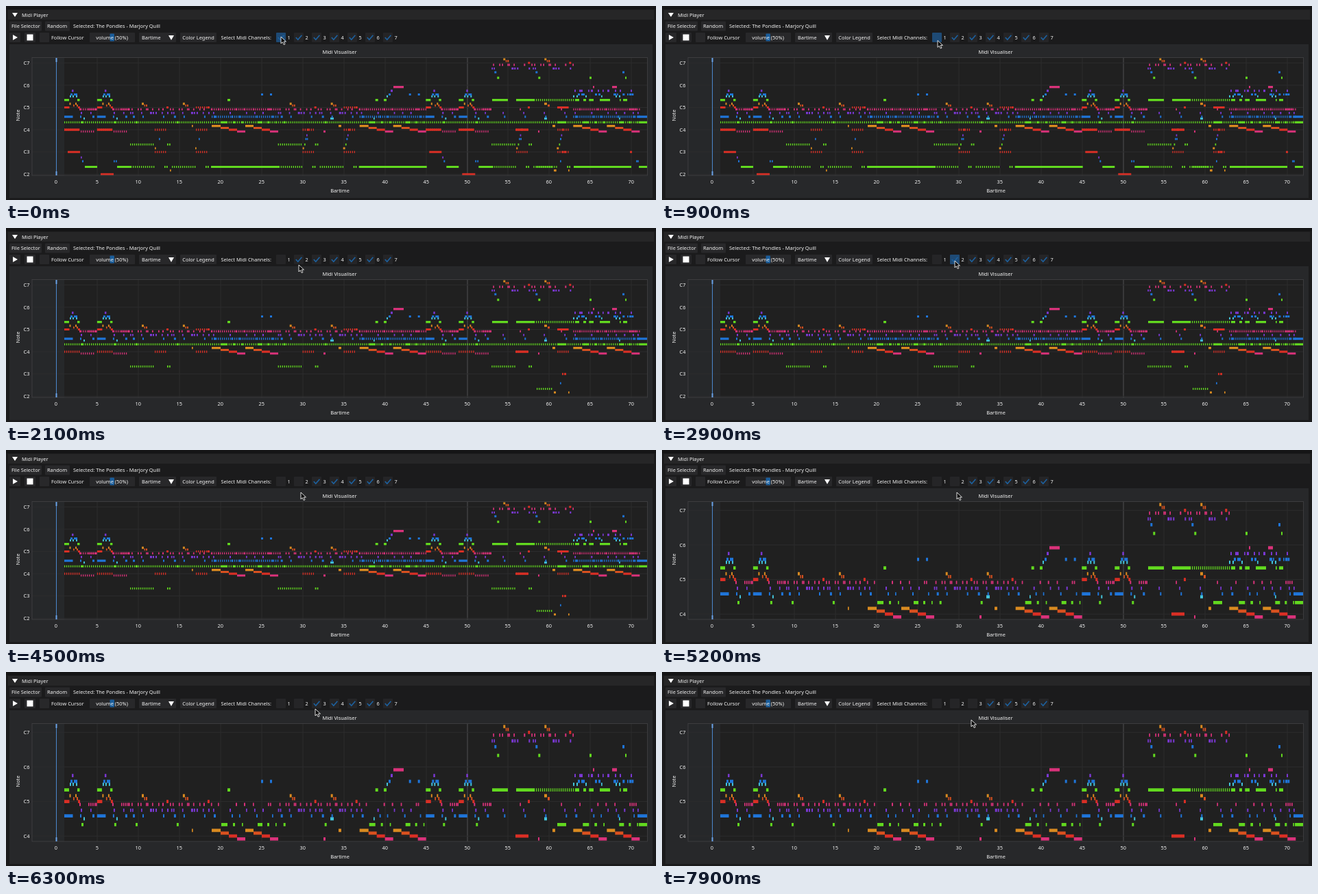
Recreate the animation shown at these times as an HTML page. Size 948 by 284 pixels, loop 8 s.

```html
<!DOCTYPE html>
<html lang="en">
<head>
<meta charset="utf-8">
<title>Midi Player</title>
<style>
html, body { margin: 0; width: 100%; height: 100%; overflow: hidden; background: #1a1a1b; }
svg { display: block; width: 948px; height: 284px; }
text { font: 500 7.4px "Noto Sans", "Open Sans", sans-serif; fill: #f4f4f4; }
</style>
</head>
<body>
<svg id="stage" viewBox="0 0 948 284"></svg>
<script>
const NS = "http://www.w3.org/2000/svg";
const stage = document.getElementById("stage");
const LOOP = 8000, BAR = 11.985, ZERO = 73.3;
const PLOT = { x: 38, y: 76, w: 898, h: 172 };
const PITCH = { C: 0, "C#": 1, D: 2, E: 4, "F#": 6, G: 7, A: 9, B: 11 };
const COLORS = {
  0: "#d92f25", 1: "#d9511f", 2: "#d98a20", 4: "#62d91f",
  6: "#43c3d9", 7: "#1f75d9", 9: "#7b38d4", 11: "#d9327a"
};
const WIDE = { c4: 181.1, step: 2.715, octaves: [2, 3, 4, 5, 6, 7] };
const TIGHT = { c4: 240.2, step: 4.22, octaves: [4, 5, 6, 7] };

function add(parent, tag, attrs, content) {
  const el = document.createElementNS(NS, tag);
  for (const key in attrs) el.setAttribute(key, attrs[key]);
  if (content !== undefined) el.textContent = content;
  parent.appendChild(el);
  return el;
}
const box = (x, y, width, height, fill, rx = 0, parent = stage) =>
  add(parent, "rect", { x, y, width, height, fill, rx });
const shape = (d, fill, parent = stage) => add(parent, "path", { d, fill });
const label = (x, middle, content, anchor = "start", parent = stage) =>
  add(parent, "text", { x, y: middle + 2.7, "text-anchor": anchor }, content);

// Score: "pitch spans"; a-b is a held note, a:b a run of ticks, a lone number one tick.
function notes(score, bars = 0, lift = 0) {
  const out = [];
  for (const line of score.trim().split("\n")) {
    const [pitch, ...spans] = line.trim().split(" ");
    const pc = PITCH[pitch.slice(0, -1)];
    const semi = pc + 12 * (pitch.slice(-1) - 4) + lift;
    const put = (x, w) => out.push({ x: x + bars * BAR, w, semi, pc });
    for (const span of spans) {
      const [a, b] = span.split(/[-:]/).map(Number);
      if (b === undefined) put(a, 1.7);
      else if (span.includes("-")) put(a, b - a);
      else for (let x = a; x < b; x += BAR / 4) put(x, 1.3);
    }
  }
  return out;
}
const repeat = (score, starts, lift) => starts.flatMap(bar => notes(score, bar, lift));

const intro = `A5 96-98.5
G5 94-97 99-104
F#5 93-95 97-99 102-104
E5 85-92 104-107.5
D5 92.5-94.5 101-103
C#5 98 103-105
C5 85-92.5 105-108
B4 107-109 120 123 126 129 131
A4 109-111 123
G4 85-97.5 108-110 126-129
F#4 113-115
E4 110-113`;

const melody = `D5 198-201
C#5 201.5-203 204-206
C5 234-237
B4 183 192 196 204 206 213 228-230 239
A4 181 184 210-213 214-216 218-220 235-237
G4 185-188
E4 189-192`;

const backing = `B4 222
A4 197 227
G4 199-201 229-231`;

const chorus = `G5 372-375 385-388
E5 323-327
B4 309 335-337 347-349 360 382 385
A4 302 326-328 350 362 374-376
G4 303-306 329-331 340 365-367 388
E4 314-323 331-334 344 367-374 381-384 393
D4 300-313 349-361
C#4 313-325 361-373
C4 325-337 373-385
B3 337-349 385-397`;

const solos = `B5 565-580 856-858 884-891
A5 561-564 829-831 836-841 849 853-856 863-865 870 877-880 888-890 895-897 911-913
G5 558-561 834-837 839-844 859-862 864-867 886-890 891 906 909-912
F#5 555-557 827-829 832-834 845-847 868 889-891 894-896
E5 539-542 551-555 709-732 744-770 770:828 830-836 842-846 851-857 866-881 895 900-906
D5 785-789
C#5 790-793
C5 761-764`;

const accents = `G6 899-902
E6 851-854 903-905
B4 915 918
A4 914 921
G4 921-935
F#4 473-478 536 785-789 894
E4 804-817 842-850 859-862 923-935
D4 271 485-489 797-801
C4 743-762
B3 463-466 776-778`;

const upper = [
  ...repeat(intro, [0, 4, 44, 48]),
  ...repeat(melody, [0, 5, 18, 23]),
  ...repeat(melody, [44, 49], 24),
  ...repeat(backing, [0, 5, 18, 23, 44, 49]),
  ...repeat(chorus, [0, 18, 44]),
  ...notes(solos), ...notes(accents)
];

const second = [
  ...notes("E4 85:935\nE2 774:797\nC5 804-820\nC3 811-813 814-817\nG2 808\nD2 799-802 820"),
  ...repeat("C4 85:107\nB3 109:128\nB4 109:131", [0, 4, 44, 48]),
  ...repeat("E3 181:215 235 238\nC4 217:234 277:292\nC5 277:292", [0, 18, 44]),
  ...repeat("B4 300:396\nG4 300:398", [0, 18, 44])
];

const run = `D3 433
E3 435
G3 436.5
A3 438
C4 440`;
const first = [
  ...repeat("C4 85-107", [0, 4, 44, 48]),
  ...repeat("C3 90-108\nA2 109\nG2 111-113\nE2 115-133", [0, 44]),
  ...repeat("C2 138-157\nG2 157 160\nE2 162-182", [0, 44]),
  ...repeat("E2 182:215 231 234 242:275 291 294\nC3 217:234 277:292\nD3 217 276\nG3 223 281", [0, 18, 44]),
  ...repeat("E2 299-398", [0, 18]),
  ...repeat(run, [0, 5, 26, 31]),
  ...notes("E2 828-912\nC3 910-913\nG2 919 921\nE2 923-935\nD2 239 801")
];

function drawNotes(parent, list, view) {
  const paths = {};
  const h = view.step * 1.12;
  for (const { x, w, semi, pc } of list) {
    const y = view.c4 - semi * view.step - h / 2;
    paths[pc] = (paths[pc] || "") + `M${x.toFixed(1)} ${y.toFixed(1)}h${w}v${h}h${-w}z`;
  }
  for (const pc in paths) shape(paths[pc], COLORS[pc], parent);
}

// Window and toolbar
box(0, 0, 948, 284, "#1b1b1c");
box(0, 0, 948, 5, "#151516");
box(3, 5.5, 942, 14.5, "#262627");
shape("M9 10h8l-4 6z", "#fff");
label(23, 13, "Midi Player");
const button = (x, y, w) => box(x, y, w, 14, "#28282a", 1);
button(5, 22.5, 47);
label(8, 29.5, "File Selector");
button(57, 22.5, 36);
label(60, 29.5, "Random");
label(98, 29.5, "Selected: The Pondles - Marjory Quill");
button(5, 39, 16);
shape("M10 42v8l7-4z", "#fff");
button(27, 39, 16);
box(30.5, 41.5, 9, 9, "#fff");
button(49, 39, 14);
label(66, 46, "Follow Cursor");
button(122, 39, 66);
box(151.5, 40.5, 6.5, 11, "#1a5d9b", 1);
label(154.5, 46, "volume (50%)", "middle");
button(194, 39, 54);
label(198, 46, "Bartime");
shape("M237 43h8l-4 7z", "#fff");
button(254, 39, 53);
label(280.5, 46, "Color Legend", "middle");
label(313.5, 46, "Select Midi Channels:");

const channels = Array.from({ length: 7 }, (_, i) => {
  const x = 394 + 26 * i;
  const frame = box(x, 39, 14, 14, "#252527", 1);
  const tick = add(stage, "path", {
    d: `M${x + 2.8} 46l3 3.3l5.6-6.6`, fill: "none", stroke: "#1d619f", "stroke-width": 1.6
  });
  label(x + 18.5, 46, i + 1, "middle");
  return { x, frame, tick };
});

// Plot
box(5, 56, 938, 225, "#27282a");
label(486.5, 67.3, "Midi Visualiser", "middle");
label(487, 270.5, "Bartime", "middle");
add(stage, "text", { transform: "translate(20 160) rotate(-90)", "text-anchor": "middle" }, "Note");
box(PLOT.x, PLOT.y, PLOT.w, PLOT.h, "#202020");
box(PLOT.x, PLOT.y, 47, PLOT.h, "#26282a");
for (let bar = 0; bar <= 70; bar += 5) {
  const x = Math.round(ZERO + bar * BAR) - 0.5;
  box(x, PLOT.y, 1, PLOT.h, bar === 50 ? "#505052" : "#2c2c2d");
  label(x + 0.3, 257, bar, "middle");
}

const clip = add(add(stage, "defs"), "clipPath", { id: "plot" });
box(PLOT.x, PLOT.y, PLOT.w, PLOT.h, "#fff", 0, clip);

function plotView(view, layers) {
  const root = add(stage, "g");
  for (const octave of view.octaves) {
    const y = view.c4 - (octave - 4) * 12 * view.step;
    box(PLOT.x, y - 0.5, PLOT.w, 1, "#2c2c2d", 0, root);
    label(34.5, y, "C" + octave, "end", root);
  }
  const groups = layers.map(list => {
    const group = add(root, "g", { "clip-path": "url(#plot)" });
    drawNotes(group, list, view);
    return group;
  });
  return { root, groups };
}
const wide = plotView(WIDE, [first, second, upper]);
const tight = plotView(TIGHT, [upper]);

add(stage, "rect", { x: 38, y: 75.5, width: 897.5, height: 172.5, fill: "none", stroke: "#434345", "stroke-width": 0.8 });
box(73, 76, 1, 172, "#4a86cc");
box(72.5, 76, 2, 6, "#6aa2e8");
box(72.5, 242, 2, 6, "#6aa2e8");

const cursor = add(stage, "path", {
  d: "M0 0v10l2.4-2.2l1.8 3.8l1.8-.8l-1.8-3.7h3.3z",
  fill: "#080808", stroke: "#f4f4f4", "stroke-width": 0.9
});

// Pointer stops: time, x, y
const pointer = [
  [0, 401, 45], [800, 401, 45], [1000, 403, 56], [1400, 423, 55], [1600, 427, 54],
  [2300, 427, 54], [2600, 427, 48], [4000, 427, 48], [4400, 430, 62], [5500, 430, 62],
  [6000, 449, 57], [6200, 451, 54], [6400, 451, 54], [6700, 451, 47],
  [7300, 451, 47], [7800, 451, 70], [LOOP, 451, 70]
];
const UNCHECK = [600, 3900, 7200];
const HIDE_FIRST = 2000, HIDE_SECOND = 5200;

function pointerAt(t) {
  const i = pointer.findIndex(stop => stop[0] > t);
  const [t0, x0, y0] = pointer[i - 1], [t1, x1, y1] = pointer[i];
  const k = (t - t0) / (t1 - t0);
  return [x0 + (x1 - x0) * k, y0 + (y1 - y0) * k];
}
const show = (el, on) => el.setAttribute("visibility", on ? "inherit" : "hidden");

function render(time) {
  const t = Math.floor((time % LOOP) / 100) * 100;
  const [px, py] = pointerAt(t);
  cursor.setAttribute("transform", `translate(${px} ${py})`);
  channels.forEach(({ x, frame, tick }, i) => {
    const hover = px >= x && px < x + 14 && py >= 39 && py < 53;
    frame.setAttribute("fill", hover ? "#1e4a75" : "#252527");
    show(tick, !(t >= UNCHECK[i]));
  });
  show(wide.root, t < HIDE_SECOND);
  show(tight.root, t >= HIDE_SECOND);
  show(wide.groups[0], t < HIDE_FIRST);
}

const start = performance.now();
function frame() {
  render(performance.now() - start);
  requestAnimationFrame(frame);
}
frame();
</script>
</body>
</html>
```
